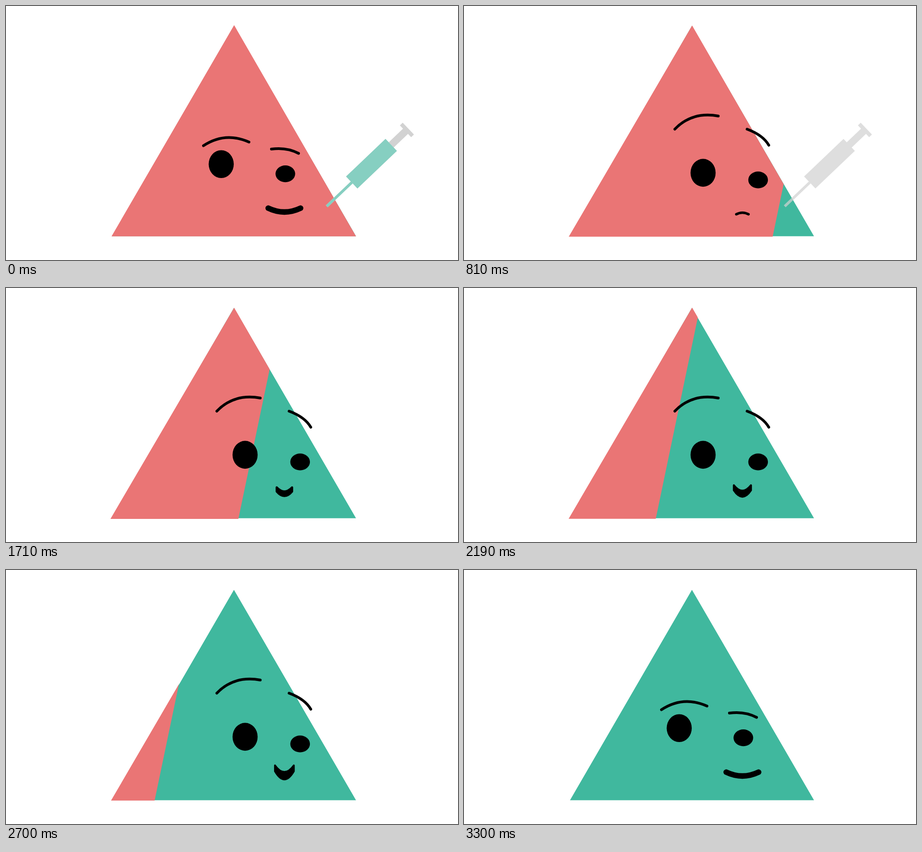
These frames come from a looping animation (998 by 561 pixels, 4.5 s). An HTML page:

```html
<!DOCTYPE html>
<html lang="en">
<head>
<meta charset="utf-8">
<title>Triangle and syringe</title>
<style>
  html, body { margin: 0; width: 100%; height: 100%; overflow: hidden; background: #fff; }
  svg { display: block; width: 100%; height: 100%; }
  .brow { fill: none; stroke: #000; stroke-width: 6; stroke-linecap: round; }
</style>
</head>
<body>
<svg viewBox="0 0 998 561">
  <clipPath id="wipe"><polygon id="wipeShape"/></clipPath>
  <polygon points="503.3,43.7 772.8,508.4 234,508.4" fill="#40b89e"/>
  <g clip-path="url(#wipe)"><polygon id="red" fill="#ea7575"/></g>
  <g id="syringe" transform="translate(850.5 306.8) rotate(136.4)">
    <g fill="#d2d2d2">
      <rect x="-52.2" y="-18" width="8.5" height="36"/>
      <rect x="-45" y="-8" width="47" height="16"/>
      <rect y="-18.2" width="120.3" height="36.4"/>
      <rect x="120" y="-3" width="76.5" height="6"/>
    </g>
    <g fill="#86cfc1">
      <rect id="barrelFluid" y="-18.2" height="36.4"/>
      <rect id="needleFluid" y="-3" height="6"/>
    </g>
  </g>
  <path id="browL" class="brow"/>
  <path id="browR" class="brow"/>
  <ellipse id="eyeL" cx="475.2" cy="349.2" rx="27.7" ry="30.8"/>
  <ellipse id="eyeR" cx="616.8" cy="370.6" rx="21.7" ry="18.6"/>
  <path id="mouth" stroke="#000" stroke-linejoin="round"/>
</svg>
<script>
const LOOP = 4500, STEP = 30;
const STARTLE_MS = 330, CALM_AT = 2970, GRIN_AT = 810;

const $ = id => document.getElementById(id);
const lerp = (a, b, u) => a + (b - a) * u;
const ramp = (t, from, to) => Math.min(1, Math.max(0, (t - from) / (to - from)));

function set(id, attrs) {
  for (const name in attrs) $(id).setAttribute(name, attrs[name]);
}

// Start, control and end point of each brow: calm, then startled.
const BROW_L = [[436, 308.5, 484, 277, 536.5, 300.5], [465.5, 272, 503, 232.6, 561.5, 243]];
const BROW_R = [[586, 316, 620, 311.5, 646, 325.5], [625, 272, 660, 285, 673, 307.5]];

// Heights of the mouth: tips, middle of the upper edge, sides, middle of the lower edge.
const SMILE = { half: 35.7, tip: 446.5, top: 455, side: 446.5, bottom: 455, line: 12.4 };
const FROWN = { half: 13.5, tip: 460, top: 456.5, side: 460, bottom: 456.5, line: 5.5 };
const GRIN = { half: 21.8, tip: 429.7, top: 445.4, side: 443.5, bottom: 463.4, line: 3.9 };

function mixMouth(a, b, u, rise = u) {
  const m = {};
  for (const key in a) {
    const rises = key === 'tip' || key === 'top' || key === 'side';
    m[key] = lerp(a[key], b[key], rises ? rise : u);
  }
  return m;
}

function drawBody(t) {
  const sway = Math.sin(Math.PI * ramp(t, 0, 3200));
  const base = 508.8 + 1.1 * sway;
  set('red', { points: `503.7,${42.2 + 1.2 * sway} 772.8,${base} ${233 - 2.4 * sway},${base}` });

  const x = 681.8 - 0.187 * (t - 810), slope = 0.2088;
  set('wipeShape', {
    points: `-300,0 ${x + slope * 508},0 ${x - slope * 53},561 -300,561`
  });
}

function drawSyringe(t) {
  const level = 196.5 * ramp(t, 0, 740);
  const needle = Math.max(level, 120);
  set('barrelFluid', { x: level, width: Math.max(0, 120.3 - level) });
  set('needleFluid', { x: needle, width: 196.5 - needle });
  set('syringe', { opacity: 1 - ramp(t, 670, 1160) });
}

function drawBrow(id, [calm, raised], u) {
  const [x0, y0, cx, cy, x1, y1] = calm.map((v, i) => lerp(v, raised[i], u));
  set(id, { d: `M${x0} ${y0}Q${cx} ${cy} ${x1} ${y1}` });
}

function drawMouth(t, startle) {
  const grow = ramp(t, GRIN_AT, CALM_AT);
  const m = mixMouth(SMILE, mixMouth(FROWN, GRIN, grow, Math.sqrt(grow)), startle);
  const c = 614.7, l = c - m.half, r = c + m.half, b = m.half / 3;
  const upper = 2 * m.top - m.tip;
  const lower = (4 * m.bottom - m.side) / 3;
  set('mouth', {
    d: `M${l} ${m.tip}Q${c} ${upper} ${r} ${m.tip}L${r} ${m.side}` +
       `C${c + b} ${lower} ${c - b} ${lower} ${l} ${m.side}Z`,
    'stroke-width': m.line
  });
}

function drawFace(t) {
  const startle = ramp(t, 0, STARTLE_MS) - ramp(t, CALM_AT, CALM_AT + STARTLE_MS);
  drawBrow('browL', BROW_L, startle);
  drawBrow('browR', BROW_R, startle);
  set('eyeL', { transform: `translate(${52.7 * startle} ${19.2 * startle})` });
  set('eyeR', { transform: `translate(${32.6 * startle} ${13.5 * startle})` });
  drawMouth(t, startle);
}

function draw(ms) {
  const t = Math.floor((ms % LOOP) / STEP) * STEP;
  drawBody(t);
  drawSyringe(t);
  drawFace(t);
}

const start = performance.now();
function tick() {
  draw(performance.now() - start);
  requestAnimationFrame(tick);
}
tick();
</script>
</body>
</html>
```
